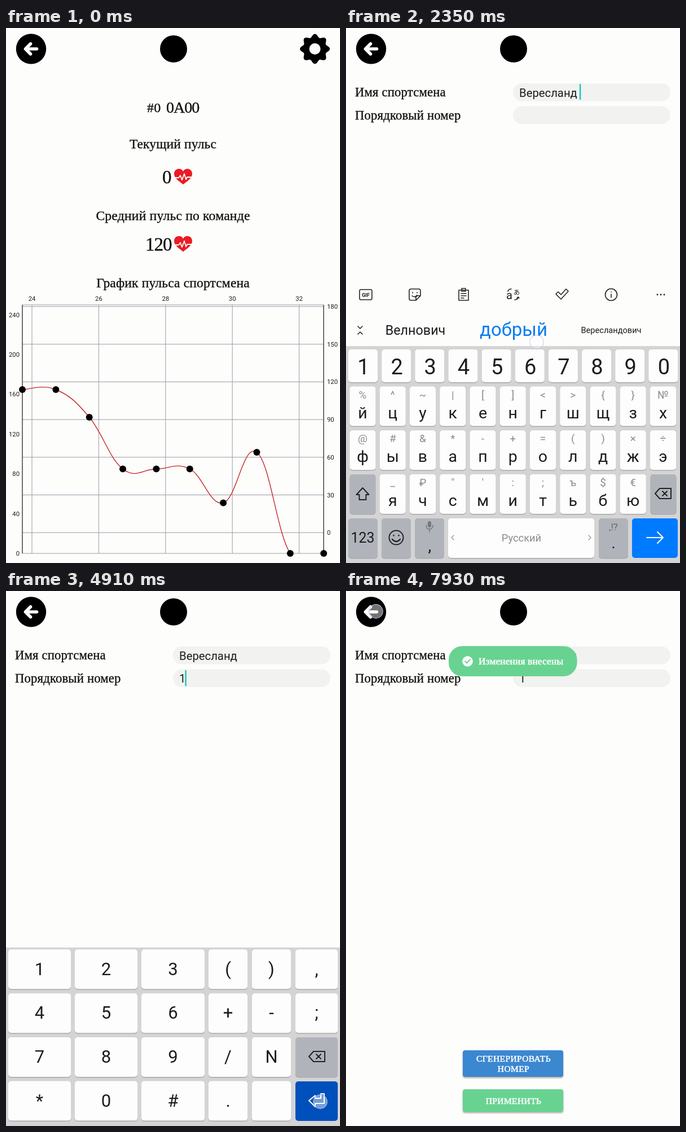
Animation of 592 by 947 pixels, one loop 8000 ms. Source, as an HTML page:

```html
<!DOCTYPE html>
<html lang="ru">
<head>
<meta charset="utf-8">
<style>
html, body { margin: 0; width: 100%; height: 100%; overflow: hidden; background: #fdfdfc; }
svg { display: block; width: 100vw; height: 100vh; }
text { font-family: Roboto, sans-serif; fill: #1c1c1e; white-space: pre; }
.slab { font-family: "Liberation Serif", serif; fill: #111; stroke: #111; stroke-width: .35; letter-spacing: .17px; }
.digits { letter-spacing: -1px; }
.white { fill: #fff; stroke: #fff; stroke-width: .55; }
.btn { letter-spacing: .4px; }
.raised { filter: drop-shadow(0 2px 1.5px #0005); }
.caps .letter { text-transform: uppercase; }
.line { fill: none; stroke: #222; stroke-width: 1.6; stroke-linecap: round; stroke-linejoin: round; }
</style>
</head>
<body>
<svg id="stage" viewBox="0 0 592 947"></svg>
<script>
const LOOP = 8000, NAME = 'Вересланд ';
const esc = s => s.replace(/&/g, '&amp;').replace(/</g, '&lt;');
const text = (x, y, size, s, attrs = '') =>
  `<text x="${x}" y="${y}" font-size="${size}" ${attrs}>${esc(s)}</text>`;
const mid = (x, y, size, s, attrs = '') => text(x, y, size, s, `text-anchor="middle" ${attrs}`);
const slab = (x, y, size, s, cls = '') => text(x, y, size, s, `class="slab ${cls}"`);
const slabMid = (x, y, size, s, cls = '') => mid(x, y, size, s, `class="slab ${cls}"`);
const rect = (x, y, w, h, fill, r = 0, attrs = '') =>
  `<rect x="${x}" y="${y}" width="${w}" height="${h}" rx="${r}" fill="${fill}" ${attrs}/>`;
const circle = (x, y, r, fill, attrs = '') => `<circle cx="${x}" cy="${y}" r="${r}" fill="${fill}" ${attrs}/>`;
const path = (d, attrs = 'class="line"') => `<path d="${d}" ${attrs}/>`;
const group = (id, body, attrs = '') => `<g id="${id}" ${attrs}>${body}</g>`;
const stroke = (color, width) =>
  `fill="none" stroke="${color}" stroke-width="${width}" stroke-linecap="round" stroke-linejoin="round"`;

function header() {
  return circle(44.5, 37, 26.7, '#000') +
    path('M43.5 28L34.5 37L43.5 46M35 37H54.5', stroke('#fff', 5.6)) +
    circle(297, 37, 24, '#000');
}

function gear() {
  const pts = Array.from({ length: 161 }, (_, i) => {
    const a = i * Math.PI / 80, r = 23.7 + 2.8 * Math.cos(8 * a);
    return `${(547.5 + r * Math.cos(a)).toFixed(1)} ${(37 + r * Math.sin(a)).toFixed(1)}`;
  });
  return path(`M${pts.join('L')}Z`, 'fill="#000"') + circle(547.5, 37, 10, '#fdfdfc');
}

function heart(x, y) {
  return `<g transform="translate(${x} ${y})">` +
    path('M0 14C-6 9-16 3-16-5C-16-14-4-17 0-9C4-17 16-14 16-5C16 3 6 9 0 14Z', 'fill="#e91c24"') +
    path('M-16 2H-8L-5-2L-2 6L2-5L5 5L7 1H16', stroke('#fff', 1.8)) + '</g>';
}

function chart() {
  const grid = 'stroke="#9c9ca6" stroke-width="1"', axis = 'stroke="#333" stroke-width="1.4"';
  let s = '';
  for (let i = 0; i < 5; i++) {
    const x = 46 + 118.4 * i;
    s += path(`M${x} 490V930`, grid) + mid(x, 483, 11.3, `${24 + 2 * i}`);
  }
  for (let i = 0; i < 7; i++) {
    const y = 493 + 66.7 * i;
    s += path(`M29 ${y}H563`, grid) + text(569, y + 4, 11.3, `${180 - 30 * i}`);
    s += text(24, 934 - 70.4 * i, 11.3, `${40 * i}`, 'text-anchor="end"');
  }
  s += path('M29 490H563M29 930H563', grid) + path('M29 490V930M563 490V930', axis);
  const levels = [640, 640, 689, 780.5, 780.5, 780.5, 840.5, 751, 930, 930];
  const p = levels.map((y, i) => [29 + 59.35 * i, y]);
  const at = i => p[Math.max(0, Math.min(9, i))];
  const ctrl = (i, sign) => at(i).map((v, k) => v + sign * .2 * (at(i + 1)[k] - at(i - 1)[k]));
  let d = `M${p[0]}`;
  for (let i = 1; i < 10; i++) d += `C${ctrl(i - 1, 1)} ${ctrl(i, -1)} ${p[i]}`;
  s += '<clipPath id="plot"><rect x="29" y="490" width="534" height="440"/></clipPath>' +
    path(d, 'fill="none" stroke="#c4282c" stroke-width="1.4" clip-path="url(#plot)"');
  return s + p.map(([x, y]) => circle(x, y, 6, '#000')).join('');
}

function pulsePage() {
  return gear() + slab(250, 149, 24, '#0') + slab(284, 150, 28, '0A00', 'digits') +
    slabMid(296, 213, 23.5, 'Текущий пульс') + slab(277, 275, 33, '0', 'digits') + heart(314, 263) +
    slabMid(296, 340, 23.7, 'Средний пульс по команде') + slab(247, 394, 33, '120', 'digits') + heart(314, 382) +
    slabMid(296, 459, 23.5, 'График пульса спортсмена') + chart();
}

function button(y, h, fill, lines) {
  return rect(207, y, 178, h, fill, 4, 'class="raised"') +
    lines.map(([s, base]) => slabMid(297, base, 15.5, s, 'white btn')).join('');
}

function formPage() {
  return slab(16, 121, 22.7, 'Имя спортсмена') + slab(16, 162, 22.7, 'Порядковый номер') +
    rect(296, 98, 279, 31.5, '#f2f2f1', 15.7) + rect(296, 138.5, 279, 31.5, '#f2f2f1', 15.7) +
    text(307, 121.5, 20.3, '', 'id="name"') + text(307, 162, 20.3, '', 'id="number"') +
    rect(0, 99, 2.4, 28, '#12c9b4', 0, 'id="caret"') +
    button(813, 47, '#3b87d0', [['СГЕНЕРИРОВАТЬ', 833], ['НОМЕР', 851]]) +
    button(882, 40, '#68d391', [['ПРИМЕНИТЬ', 908]]);
}

const key = (x, y, w, h, fill = '#fdfdfd') =>
  rect(x, y + 1.5, w, h, '#a9a9ab', 5) + rect(x, y, w, h, fill, 5);
const GRAY = '#b0b4ba';
const enterKey = x => rect(x, 868, 588 - x, 70, '#007aff', 5, 'class="enter"');
const backspace = (x, y) =>
  path(`M${x - 14} ${y}l8-9h20v18h-20zM${x - 1} ${y - 4}l8 8m0-8l-8 8`, stroke('#222', 2));

function toolbar() {
  return path('M26 463h18q2 0 2 3v12q0 3-2 3H26q-2 0-2-3V466q0-3 2-3Z') +
    mid(35, 475.5, 9, 'GIF', 'font-weight="700"') +
    path('M115 462h14q3 0 3 3v9l-8 8h-9q-3 0-3-3v-14q0-3 3-3ZM132 474h-5q-3 0-3 3v5M117 474q5 4 9-1M118 468v1M126 468v1') +
    path('M200 464h17v18h-17ZM205 461h7v5h-7ZM204 470h9M204 474h9M204 478h5') +
    text(284, 480, 20, 'a') + text(297, 472, 11, 'あ', 'style="font-family:\'Noto Sans CJK JP\',sans-serif"') +
    path('M287 466q1-4 6-4M299 481q6 0 6-5l-2 2m2-2l2 2') +
    path('M372 471l4-4l5 5l9-10l4 4l-13 14Z') +
    circle(470, 472, 10.5, 'none', 'class="line"') + path('M470 471v6M470 467v.3') +
    [552, 558, 564].map(x => circle(x, 472, 1.4, '#222')).join('') +
    path('M21 528l4 4l4-4M21 542l4-4l4 4');
}

function letterKeyboard() {
  let s = rect(0, 441, 592, 122, '#fdfdfc') + toolbar() + group('words', '') + rect(0, 563, 592, 384, '#d4d4d4');
  [...'1234567890'].forEach((c, i) => {
    const x = 4 + 59.15 * i;
    s += key(x, 569, 52, 58) + mid(x + 27, 613, 38, c);
  });
  const rows = [['йцукенгшщзх', '%^~|[]<>{}№', 0], ['фывапролджэ', '@#&*-+=()×÷', 0], ['ячсмитьбю', '_₽"\':;ъ$€', 1]];
  rows.forEach(([letters, hints, skip], r) => [...letters].forEach((c, i) => {
    const x = 6.5 + 53.25 * (i + skip), y = 634.5 + 77.7 * r;
    s += key(x, y, 46, 70) + mid(x + 23, y + 21, 19, hints[i], 'style="fill:#8c8c8e"') +
      mid(x + 23, y + 56, 28.5, c, 'class="letter"');
  }));
  s += key(6.5, 790, 46, 70, GRAY) + path('M29.5 814l11 12h-5v9h-12v-9h-5z', stroke('#222', 2)) +
    key(539.5, 790, 46, 70, GRAY) + backspace(562, 824);
  [4, 63, 122, 448].forEach(x => s += key(x, 868, 52, 70, GRAY));
  s += mid(29.5, 911, 25, '123') +
    circle(89, 902, 12.5, 'none', stroke('#222', 2)) + path('M82 905q7 8 14 0M84.5 898v.5M93.5 898v.5', stroke('#222', 2.4)) +
    rect(145, 873, 6, 11, '#777', 3) + path('M142 880q0 7 6 7t6-7M148 887v5', stroke('#777', 1.5)) +
    mid(148.5, 926, 30, ',') + mid(474, 889, 17, ',!?', 'style="fill:#666"') + mid(474, 921, 27, '.') +
    key(181, 868, 259, 70) + mid(311, 909, 18.3, 'Русский', 'style="fill:#8c8c8e"') +
    path('M191 898l-4 4l4 4M430 898l4 4l-4 4', stroke('#999', 1.4)) +
    enterKey(507) + path('M533 902H562M552 892l10 10l-10 10', stroke('#fff', 2));
  return s;
}

function numberKeyboard() {
  const cols = [[4, 111], [122, 111], [240, 112], [359, 69], [436, 69], [513, 75]];
  let s = rect(0, 631, 592, 316, '#d4d4d4');
  ['123(),', '456+-;', '789/N', '*0#. '].forEach((row, r) => [...row].forEach((c, i) => {
    const [x, w] = cols[i], y = 634.5 + 77.7 * r;
    s += key(x, y, w, 70) + mid(x + w / 2, y + 45, 31, c);
  }));
  return s + key(513, 790, 75, 70, GRAY) + backspace(551, 824) + enterKey(513) +
    path('M537 902l11-9v5h10v-8h6v17h-16v6z', stroke('#fff', 2));
}

const toast = (x, w, h, body) => rect(x, 97.5, w, h, '#68d391', 24) + body;
const stage = document.getElementById('stage');
stage.innerHTML = header() + group('pulse', pulsePage()) + group('form', formPage()) +
  group('ready', toast(174, 244.5, 55, slab(201, 130.5, 17.3, 'Датчик готов к настройке', 'white'))) +
  group('saved', toast(182, 227.5, 53.5, circle(215.5, 124.5, 9.3, '#fff') +
    path('M211 124.5l3 3l6-6', stroke('#68d391', 2)) + slab(235, 130, 17.3, 'Изменения внесены', 'white'))) +
  group('letters', letterKeyboard()) + group('numbers', numberKeyboard()) +
  circle(0, 0, 12.2, '#fff', 'id="touch" fill-opacity=".45" stroke="#b9b9e0" stroke-opacity=".8" stroke-width="1.4"');

const $ = id => document.getElementById(id);
const show = (el, on) => el.setAttribute('display', on ? 'inline' : 'none');
const clamp = v => Math.max(0, Math.min(1, v));
const ramp = (t, a, b) => { const u = clamp((t - a) / (b - a)); return u * u * (3 - 2 * u); };

// Springs open with a slight overshoot, then shrinks away.
function zoom(id, t, start, end) {
  const u = clamp((t - start) / 240) - 1, out = ramp(t, end, end + 160);
  const scale = (1 + 2.3 * u ** 3 + 1.3 * u * u) * (1 - out);
  show($(id), t >= start && scale > .01);
  $(id).setAttribute('transform', `translate(296 125) scale(${scale}) translate(-296 -125)`);
}

// start, end, x, y
const touches = [
  [150, 430, 548, 40], [930, 1140, 532, 120], [1720, 1900, 190, 752], [2140, 2430, 338, 556],
  [2560, 2790, 548, 905], [3740, 3960, 60, 672], [4830, 5040, 557, 904], [6150, 6390, 300, 903], [7830, 8060, 53, 36]
];

function words(t) {
  const [a, b, c] = t < 1830 ? ['Я', 'Привет', 'Как'] :
    t < 2230 ? ['А', NAME.trim(), 'Алый'] : ['Велнович', 'добрый', 'Вересландович'];
  const big = b.length > 6 ? 25 : 33;
  return mid(123, 543, 23.3, a) + mid(297, 545, big, b, 'style="fill:#087cf0"') +
    mid(470, 540, c.length > 8 ? 14.6 : 23.3, c);
}

function render(t) {
  show($('pulse'), t < 450);
  show($('form'), t >= 450);
  zoom('ready', t, 560, 1500);
  zoom('saved', t, 6480, LOOP);

  $('name').textContent = t < 1830 ? '' : t < 2230 ? NAME[0] : NAME;
  $('number').textContent = t < 3860 ? '' : '1';
  const second = t >= 2860;
  const blinkFrom = [3860, 2860, 2230, 1830, 1120].find(s => t >= s) || 0;
  show($('caret'), t >= 1120 && t < 6250 && (t - blinkFrom) % 1000 < 500);
  const field = $(second ? 'number' : 'name');
  $('caret').setAttribute('x', 306 + field.getComputedTextLength());
  $('caret').setAttribute('y', second ? 140 : 99);

  show($('letters'), t >= 1220 && !second);
  $('letters').setAttribute('transform', `translate(0 ${506 * (1 - ramp(t, 1220, 1460))})`);
  $('letters').setAttribute('class', t < 1830 ? 'caps' : '');
  $('words').innerHTML = words(t);
  show($('numbers'), second && t < 5280);
  $('numbers').setAttribute('transform', `translate(0 ${316 * ramp(t, 5050, 5280)})`);
  const pressed = (t > 2560 && t < 2740) || (t > 4830 && t < 5000);
  document.querySelectorAll('.enter').forEach(el => el.setAttribute('fill', pressed ? '#0050bb' : '#007aff'));

  const hit = touches.find(([a, b]) => t >= a && t < b);
  show($('touch'), hit);
  if (hit) {
    $('touch').setAttribute('cx', hit[2]);
    $('touch').setAttribute('cy', hit[3]);
    $('touch').setAttribute('opacity', clamp((hit[1] - t) / 120));
  }
}

function frame() {
  render(performance.now() % LOOP);
  requestAnimationFrame(frame);
}
frame();
</script>
</body>
</html>
```
